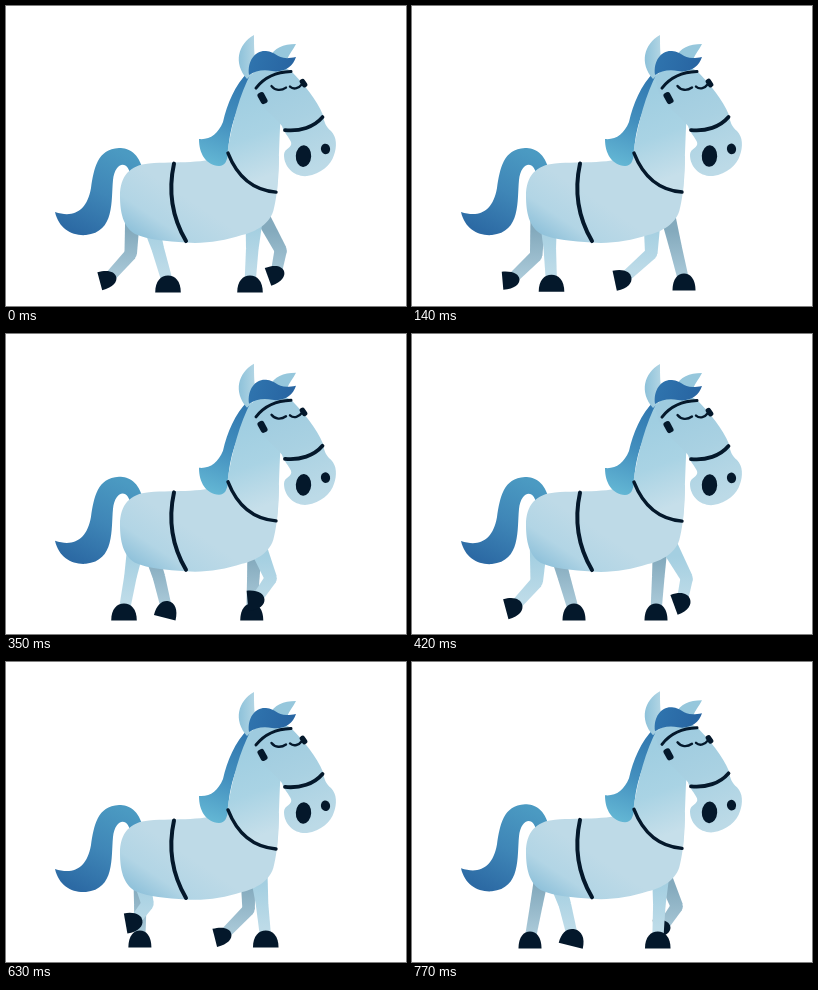
Recreate the animation shown at these times as an HTML page with a canvas. Size 400 by 300 pixels, loop 0.84 s.

```html
<!DOCTYPE html>
<html lang="en">
<head>
<meta charset="utf-8">
<title>Walking horse</title>
<style>
html, body { margin: 0; width: 100%; height: 100%; overflow: hidden; background: #fff; }
canvas { display: block; width: 400px; height: 300px; }
</style>
</head>
<body>
<canvas id="stage" width="400" height="300"></canvas>
<script>
const ctx = document.getElementById('stage').getContext('2d');
const STEP = 70, STEPS = 12;
const INK = '#04182b';

// Each stride eases between a few hoof positions: step, x, y, tilt in degrees.
const HIND = {
  hipX: 135, bendX: 11, bendY: 8,
  stride: [[0, 162, 278, 0], [4, 132, 277, 0], [5, 118, 278, 0], [6, 102, 273, 75],
           [8, 99, 274, 85], [9, 128, 260, 80], [10, 157, 268, 55]]
};
const FRONT = {
  hipX: 250, bendX: 14, bendY: 7,
  stride: [[0, 244, 278, 0], [2, 211, 273, 78], [4, 219, 274, 75],
           [5, 250, 266, 85], [6, 270, 268, 70], [8, 272, 276, 0]]
};

const mix = (a, b, u) => a + (b - a) * u;
const easeOut = u => 1 - (1 - u) ** 2;

function hoofAt(stride, step) {
  const i = stride.findLastIndex(key => key[0] <= step);
  const from = stride[i], to = stride[(i + 1) % stride.length];
  const u = easeOut((step - from[0]) / ((to[0] || STEPS) - from[0]));
  return from.slice(1).map((value, k) => mix(value, to[k + 1], u));
}

function gradient(x1, y1, x2, y2, ...colors) {
  const g = ctx.createLinearGradient(x1, y1, x2, y2);
  colors.forEach((c, i) => g.addColorStop(i / (colors.length - 1), c));
  return g;
}

function fill(d, style) {
  ctx.fillStyle = style;
  ctx.fill(new Path2D(d));
}

function line(d, width) {
  ctx.strokeStyle = INK;
  ctx.lineWidth = width;
  ctx.lineCap = 'round';
  ctx.stroke(new Path2D(d));
}

function ellipse(x, y, rx, ry, tilt, style = INK) {
  ctx.fillStyle = style;
  ctx.beginPath();
  ctx.ellipse(x, y, rx, ry, tilt, 0, Math.PI * 2);
  ctx.fill();
}

function blinker(x, y, width, height, tilt) {
  ctx.save();
  ctx.translate(x, y);
  ctx.rotate(tilt);
  ctx.fillStyle = INK;
  ctx.beginPath();
  ctx.roundRect(-width / 2, -height / 2, width, height, 2.5);
  ctx.fill();
  ctx.restore();
}

function taper(x1, y1, w1, x2, y2, w2) {
  const a = Math.atan2(y2 - y1, x2 - x1), nx = -Math.sin(a) / 2, ny = Math.cos(a) / 2;
  ctx.beginPath();
  ctx.moveTo(x1 + nx * w1, y1 + ny * w1);
  ctx.lineTo(x2 + nx * w2, y2 + ny * w2);
  ctx.lineTo(x2 - nx * w2, y2 - ny * w2);
  ctx.lineTo(x1 - nx * w1, y1 - ny * w1);
  ctx.fill();
}

function hoof(x, y, tilt, half) {
  ctx.save();
  ctx.translate(x, y);
  ctx.rotate(tilt * Math.PI / 180);
  fill(`M${-half} 8.5 C${-half} -3 ${-half * .55} -8.5 0 -8.5 C${half * .55} -8.5 ${half} -3 ${half} 8.5 Z`, INK);
  ctx.restore();
}

// The hip follows the hoof a little; the knee bends forward as the hoof tilts.
function leg({ hipX, bendX, bendY, stride }, step, far) {
  const [x, y, tilt] = hoofAt(stride, step);
  const hip = mix(hipX, x, .25), hipY = 208, bend = tilt / 80;
  const kneeX = (hip + x) / 2 + bendX * bend, kneeY = (hipY + y) / 2 + bendY * bend;
  const style = far
    ? gradient(0, 225, 0, 272, '#84aabd', '#abcad9')
    : gradient(0, 222, 0, 265, '#a4cfe1', '#bddbe8');
  ctx.fillStyle = style;
  taper(hip, hipY, far ? 15 : 18, kneeX, kneeY, 12.5);
  ellipse(kneeX, kneeY, 6, 6, 0, style);
  taper(kneeX, kneeY, 12.5, x, y, 11);
  hoof(x, y, tilt, (far ? 11.5 : 12.8) * (1 - .2 * bend));
}

function legs(step, far) {
  const phase = (step + (far ? STEPS / 2 : 0)) % STEPS;
  leg(HIND, phase, far);
  leg(FRONT, phase, far);
}

function tail() {
  fill('M137 165 C133 147 123 142 113 142 C91 143 88 163 85 182 C81 205 68 212 49 206 ' +
       'C53 223 66 230 80 229 C109 226 105 195 107 174 C109 155 123 153 125 172 Z',
    gradient(115, 145, 75, 228, '#4b9ac2', '#3f86b7', '#2c6aa4'));
}

function torso() {
  fill('M114 190 C114 170 124 159 143 157.5 C170 155 200 159 222 148 L273 150 ' +
       'C273 170 271 190 268 202 C265 218 249 226 236 229 C218 235 197 238 180 236.5 ' +
       'C160 235 143 234 129 228 C117 221 114 206 114 190 Z',
    gradient(122, 235, 160, 178, '#82bad6', '#b2d5e5', '#bedae7'));
}

function neck() {
  fill('M221 149 C226 115 234 88 245 67 L276 100 C273 120 274 145 271 186 C247 184 231 170 221 149 Z',
    gradient(232, 90, 262, 170, '#a0cee1', '#a9d3e4', '#c6dfea'));
}

function mane() {
  fill('M242 66 C229 79 221 98 217 116 C212 128 204 134 193 133 C193 148 200 159 213 160 ' +
       'C219 160 221 155 222 148 C223 122 231 99 247 75 Z',
    gradient(238, 72, 207, 158, '#3178b0', '#438fbe', '#63b6d4'));
}

function head() {
  fill('M264 51 C268 42 277 38 290 38 C287 44 283 48 281 54 Z', '#96c7dc');
  fill('M243 72 C252 57 276 57 286 66 C297 77 311 94 317 109 C318 116 320 121 325 125 ' +
       'C331 131 331 141 328 149 C325 159 315 168 301 170 C288 171 278 161 278 149 ' +
       'C278 142 287 142 285 136 C283 131 278 127 276 120 C269 111 251 98 246 84 Z',
    gradient(262, 68, 305, 165, '#9ecbdf', '#a9d1e2', '#bcdae7'));
  fill('M241 73 C227 57 232 38 248 29 C248 40 248 52 251 63 Z',
    gradient(233, 50, 250, 50, '#8ec2da', '#b5d7e5'));
  fill('M243 69 C241 54 250 44 260 45 C272 46 270 55 290 51 C287 61 277 67 266 65 C257 63 249 65 243 69 Z',
    gradient(245, 50, 285, 62, '#2f74ae', '#2865a2'));

  line('M250 82 C257 73 269 66 285 65.5', 3);
  blinker(256.5, 92, 7, 12, -.5);
  blinker(297.5, 77, 5.5, 9, -.6);
  line('M265.5 80 C269 84.5 275 85 280 81.5', 2.4);
  line('M284 80.5 C288 84 293 82 296 78', 2.4);
  line('M279 124 C294 125.5 308 121 316.5 111', 3.8);
  ellipse(297.5, 150, 7.7, 10.8, .05);
  ellipse(319.5, 142.8, 4.6, 5.3, -.2);
}

function draw(step) {
  ctx.fillStyle = '#fff';
  ctx.fillRect(0, 0, 400, 300);
  legs(step, true);
  legs(step, false);
  ctx.save();
  ctx.translate(0, .6 * (1 - Math.cos(2 * Math.PI * (step / STEPS - .1))));
  tail();
  torso();
  mane();
  neck();
  line('M168 157.5 C162 185 166 211 180 235', 4);
  line('M222 147 C231 170 246 184 270 186', 3.4);
  head();
  ctx.restore();
}

function tick(now) {
  draw(Math.floor(now / STEP) % STEPS);
  requestAnimationFrame(tick);
}

draw(0);
requestAnimationFrame(tick);
</script>
</body>
</html>
```
